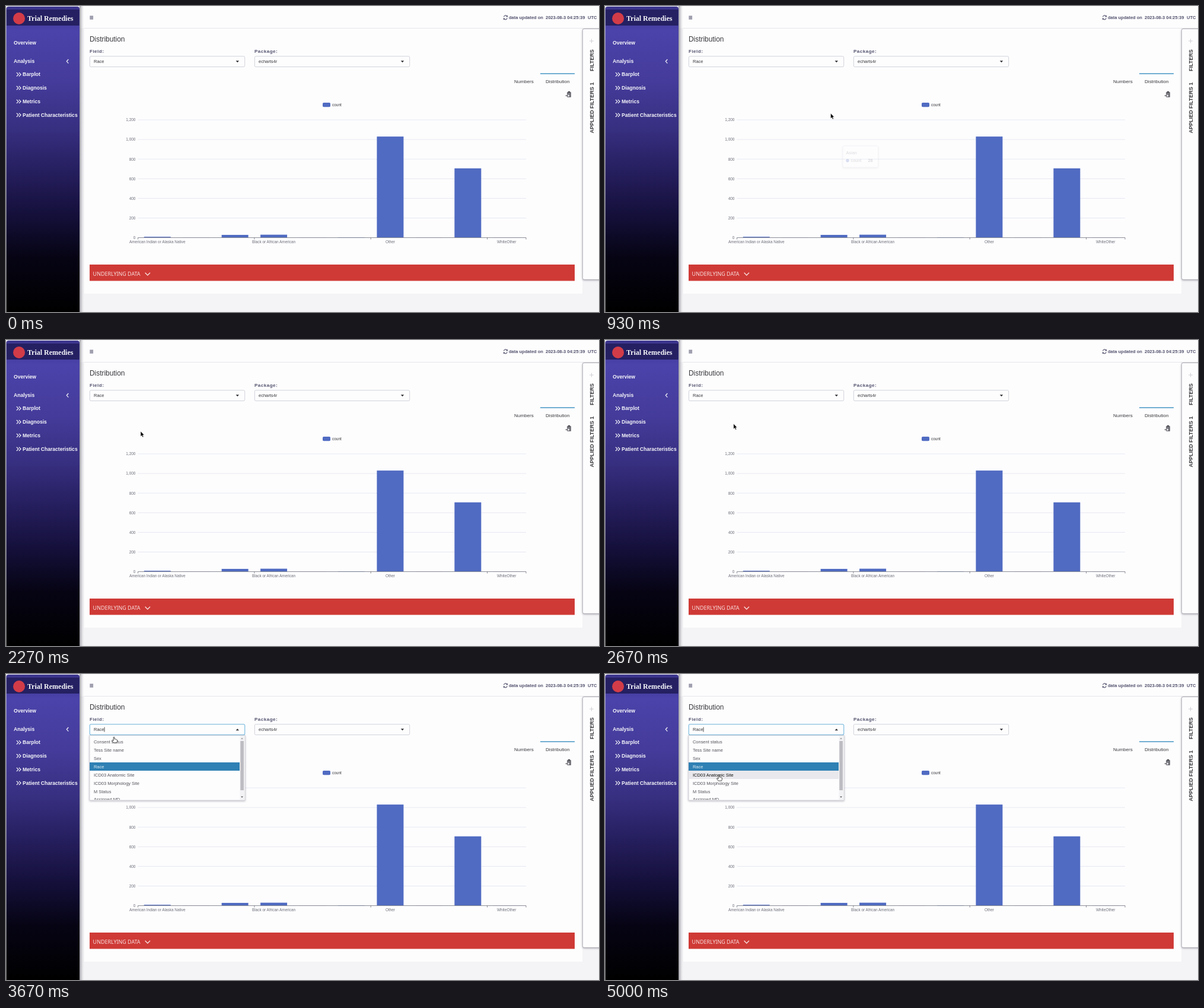
Animation, 1000 px wide and 516 px high, one loop 5.07 s. Source, as an HTML page:

```html
<!DOCTYPE html>
<html lang="en">
<head>
<meta charset="utf-8">
<title>Distribution dashboard</title>
<style>
  html, body { margin: 0; width: 100%; height: 100%; overflow: hidden; background: #f4f4f6; }
  svg { display: block; width: 100vw; height: 100vh; }
  text { font-family: "Liberation Sans", Arial, sans-serif; white-space: pre; }
  .bold { font-weight: 700; }
  .serif { font-family: "Liberation Serif", serif; font-weight: 700; }
  .noto { font-family: "Noto Sans", sans-serif; }
  .spaced { font-weight: 700; letter-spacing: .5px; }
</style>
</head>
<body>
<svg id="stage" viewBox="0 0 1000 516" xmlns="http://www.w3.org/2000/svg"></svg>
<script>
const LOOP = 5070, OPEN = 3470, BLINK = 530;
const BLUE = '#506bc2', INK = '#38383c', MUTED = '#52526e', AXIS = '#6e7079', PAPER = '#fdfdfe';

const rect = (x, y, w, h, fill, extra = '') =>
  `<rect x="${x}" y="${y}" width="${w}" height="${h}" fill="${fill}" ${extra}/>`;
const text = (x, y, size, fill, str, cls = '', extra = '') =>
  `<text x="${x}" y="${y}" font-size="${size}" fill="${fill}" class="${cls}" ${extra}>${str}</text>`;
const line = (d, stroke, width = 1, extra = '') =>
  `<path d="${d}" fill="none" stroke="${stroke}" stroke-width="${width}" ${extra}/>`;
const shape = (d, fill, extra = '') => `<path d="${d}" fill="${fill}" ${extra}/>`;
const group = (id, body) => `<g id="${id}">${body}</g>`;
const gradient = (id, dir, stops) => `<linearGradient id="${id}" ${dir}>` +
  stops.map(([at, color, alpha = 1]) =>
    `<stop offset="${at}" stop-color="${color}" stop-opacity="${alpha}"/>`).join('') +
  '</linearGradient>';

function defs() {
  return '<defs>' +
    gradient('night', 'x1="0" y1="0" x2="0" y2="1"', [
      [0, '#3b348c'], [.08, '#4b43aa'], [.25, '#443b9a'], [.4, '#372f80'],
      [.56, '#231c59'], [.69, '#130f38'], [.82, '#060414'], [1, '#000']]) +
    gradient('edge', 'x1="0" y1="0" x2="1" y2="0"', [[0, '#70707a', .7], [1, '#e0e0e6', 0]]) +
    '<filter id="soft" x="-20%" y="-20%" width="140%" height="140%">' +
    '<feDropShadow dx="0" dy="1" stdDeviation="1.8" flood-color="#444450" flood-opacity=".4"/></filter>' +
    '<clipPath id="listClip"><rect x="141" y="104" width="253" height="108"/></clipPath></defs>';
}

function sidebar() {
  const white = '#f6f6fa';
  const chevrons = y => line(`M17.8 ${y - 3.2}l3.2 3.2l-3.2 3.2M21.8 ${y - 3.2}l3.2 3.2l-3.2 3.2`, white, 1.2);
  const links = ['Barplot', 'Diagnosis', 'Metrics', 'Patient Characteristics'];
  return rect(124, 0, 8, 516, 'url(#edge)') +
    shape('M.5 516V5Q.5 1 4.5 1H120Q124 1 124 5V516Z', 'url(#night)') +
    rect(1, 6, 122.5, 27, '#252062') +
    '<circle cx="22" cy="21" r="10" fill="#d23c48"/>' +
    text(36, 25, 12, white, 'Trial Remedies', 'serif') +
    text(13, 65.3, 8.55, white, 'Overview', 'bold') +
    text(13, 96, 8.55, white, 'Analysis', 'bold') +
    line('M105.3 90l-3 3.3l3 3.3', white, 1.2) +
    links.map((name, i) => {
      const y = 115.4 + i * 22.8;
      return chevrons(y) + text(28, y + 3, 8.55, white, name, 'bold');
    }).join('');
}

function header() {
  return rect(124, 0, 876, 37, PAPER) +
    line('M132 37.5H1000', '#e6e6ea') +
    line('M141.3 17.2h5.8M141.3 19.4h5.8M141.3 21.6h5.8', MUTED, 1.1) +
    line('M839.4 18.4a3.1 3.1 0 0 1 5.6-1.1M845.2 20.4a3.1 3.1 0 0 1-5.6 1.1', MUTED, 1.1) +
    shape('M846 15.4v3h-3zM838.7 23.4v-3h3z', MUTED) +
    text(848, 22, 7.5, MUTED, 'data updated on', 'bold') +
    text(910, 22, 7.5, MUTED, '2023-08-3 04:25:39', 'bold') +
    text(981, 22, 7.5, MUTED, 'UTC', 'bold');
}

function select(x, label, value) {
  return text(x, 79.4, 8, MUTED, label, 'spaced') +
    rect(x + .3, 84.8, 261.4, 17.8, PAPER, 'rx="2" stroke="#c6c8d0" stroke-width=".8"') +
    text(x + 7, 96.4, 7.5, INK, value);
}

const caret = (x, up) => shape(up ? `M${x - 2.7} 95.2h5.4l-2.7-3z` : `M${x - 2.7} 92.2h5.4l-2.7 3z`, '#2c2c30');

function content() {
  return rect(132, 38, 840, 447, PAPER) +
    text(141, 60.2, 11.9, INK, 'Distribution') +
    select(141, 'Field:', 'Race') + select(419, 'Package:', 'echarts4r') + caret(668.5, false) +
    text(857, 130, 8.1, INK, 'Numbers') + text(910, 130, 8.1, INK, 'Distribution') +
    rect(901, 113.4, 58, 1.5, '#4496c6') +
    rect(946, 145, 7, 9, '#77777e', 'rx="1"') + rect(947.8, 143.7, 3.4, 2.5, '#4c4c52', 'rx=".8"') +
    line('M943.6 151.2h4.6', '#4c4c52', 1.2) + shape('M947.4 149l3 2.2l-3 2.2z', '#f4f4f8') +
    rect(141, 436, 818, 27.5, '#cf3a36') +
    text(146.6, 455.4, 8.95, '#f7dedd', 'UNDERLYING DATA', 'noto') +
    line('M234.6 449.8l4.2 4.1l4.2-4.1', '#f7dedd', 1.4);
}

function chart() {
  const left = 222.5, base = 390.6, slot = 65.45, barW = 45, unit = .1655;
  const counts = [9, 1, 28, 30, 1, 3, 1030, 1, 706, 1];
  const names = ['American Indian or Alaska Native', 'Black or African American', 'Other', 'WhiteOther'];
  let out = rect(534, 163, 13, 7.2, BLUE, 'rx="1.8"') + text(550, 168.6, 6.45, INK, 'count');
  for (let v = 0; v <= 1200; v += 200) {
    const y = base - v * unit;
    if (v) out += line(`M${left} ${y}H877`, '#e0e4ee', .8);
    out += text(218.4, y + 2.3, 6.45, AXIS, v.toLocaleString('en-US'), '', 'text-anchor="end"');
  }
  counts.forEach((n, i) => {
    const h = n * unit;
    out += rect(left + slot * (i + .5) - barW / 2, base - h, barW, h, BLUE);
  });
  out += line(`M${left} ${base}H877`, AXIS, .8);
  for (const i of [0, 3, 6, 9, 10]) out += line(`M${left + slot * i} ${base}v3`, AXIS, .8);
  names.forEach((name, i) => {
    out += text(left + slot * (i * 3 + .5), 399.8, 6.43, AXIS, name, '', 'text-anchor="middle"');
  });
  return out;
}

function filterPanel() {
  const label = (y, str) => text(0, 0, 9, INK, str, 'bold', `transform="translate(990.6 ${y}) rotate(-90)"`);
  return shape('M1004 38.5H975Q972.3 38.5 972.3 41.5V458.5Q972.3 461.3 975 461.3H1004Z', PAPER,
    'stroke="#a8a8b0" stroke-width=".9" filter="url(#soft)"') +
    line('M984 59h7M987.5 55.5v7', '#d0d0d6', 1) +
    label(110, 'FILTERS') + label(214.5, 'APPLIED FILTERS 1');
}

function dropdown() {
  const items = ['Consent status', 'Tess Site name', 'Sex', 'Race', 'ICD03 Anatomic Site',
    'ICD03 Morphology Site', 'M Status', 'Assigned MD'];
  const rows = items.map((name, i) => {
    const picked = name === 'Race', y = 114.2 + i * 13.95;
    return rect(141, y - 7, 253, 14, picked ? '#2f80b4' : '#e9e9ed', `id="row${i}"` + (picked ? '' : ' visibility="hidden"')) +
      text(148, y + 2.6, 7.45, picked ? '#e2eef6' : '#55555c', name, '', `id="item${i}"`);
  }).join('');
  return rect(141.3, 84.8, 261.4, 17.8, 'none', 'rx="2" stroke="#7cc0e4" stroke-width="1.1"') +
    rect(141, 103.5, 262, 109.5, PAPER, 'stroke="#c8c8d0" stroke-width=".8" filter="url(#soft)"') +
    `<g clip-path="url(#listClip)">${rows}</g>` +
    rect(394.5, 104, 8, 108.5, '#f2f2f4') + rect(395.3, 113, 5.6, 83, '#bcbcc2') +
    shape('M396 109.8h4l-2-2.2z', '#9a9aa0') + shape('M396 206.4h4l-2 2.2z', '#4a4a50');
}

function tooltip() {
  return rect(0, 0, 59.5, 36, PAPER, 'rx="2" stroke="#ccccd4" stroke-width=".8" filter="url(#soft)"') +
    text(5.5, 13.6, 7.3, '#666670', 'Asian') +
    `<circle cx="8" cy="24.8" r="2.7" fill="${BLUE}"/>` +
    text(13.5, 27.2, 7.3, '#666670', 'count') + text(42.5, 27.2, 7.3, '#666670', '28', 'bold');
}

const arrow = shape('M0 0V8.6L2 6.9L3.4 10L4.9 9.3L3.5 6.3H6.1Z', '#000', 'stroke="#fff" stroke-width=".5"');
const hand = shape('M-.9 1Q0-.6.9 1V4Q2 3.4 2.6 4.3Q3.7 3.8 4.2 4.8Q5.4 4.6 5.4 5.9V7.8L4.4 10.2H-.8' +
  'L-3.4 6.8Q-3.6 5.3-2.2 5.7L-.9 6.9Z', '#fefefe', 'stroke="#222" stroke-width=".8" stroke-linejoin="round"');

const stage = document.getElementById('stage');
stage.innerHTML = defs() + header() + content() + chart() + filterPanel() + sidebar() +
  group('down', caret(390.3, false)) + group('up', caret(390.3, true)) +
  group('list', dropdown()) + group('blink', line('M166 89.6v8', '#222', .8)) +
  group('tip', tooltip()) + group('arrow', arrow) + group('hand', hand);

const el = id => document.getElementById(id);
const show = (id, on) => el(id).setAttribute('visibility', on ? 'visible' : 'hidden');
const place = (id, x, y) => el(id).setAttribute('transform', `translate(${x} ${y})`);
const clamp = v => Math.min(1, Math.max(0, v));

// Pointer hotspot: time, x, y
const path = [
  [530, 372, 310], [670, 380.5, 216], [800, 380.5, 181], [1580, 380.5, 181],
  [2180, 227, 154], [2450, 227, 154], [3180, 180.5, 96.3], [3560, 180.5, 96.3],
  [4000, 190.5, 156], [4450, 190.5, 156], [4800, 192, 170]
];

function pointer(t) {
  const i = path.findIndex(p => p[0] > t);
  if (i < 0) return path[path.length - 1].slice(1);
  if (i === 0) return path[0].slice(1);
  const [t0, x0, y0] = path[i - 1], [t1, x1, y1] = path[i];
  const k = (t - t0) / (t1 - t0), e = k * k * (3 - 2 * k);
  return [x0 + (x1 - x0) * e, y0 + (y1 - y0) * e];
}

function draw(t) {
  const [x, y] = pointer(t), open = t >= OPEN, seen = t >= path[0][0];
  const overSelect = y < 103 || open;
  show('arrow', seen && !overSelect);
  show('hand', seen && overSelect);
  place('arrow', x, y);
  place('hand', x, y);

  const [tipX, tipY] = pointer(Math.min(t, 670));
  place('tip', tipX + 20.5, tipY + 20);
  el('tip').setAttribute('opacity', seen ? clamp((985 - t) / 260) : 0);

  const hover = open && y > 163;
  show('list', open);
  show('up', open);
  show('down', !open);
  show('blink', open && Math.floor((t - OPEN) / BLINK) % 2 === 0);
  show('row4', hover);
  el('item4').setAttribute('fill', hover ? '#111' : '#55555c');
}

const start = performance.now();
function tick() {
  draw((performance.now() - start) % LOOP);
  requestAnimationFrame(tick);
}
tick();
</script>
</body>
</html>
```
